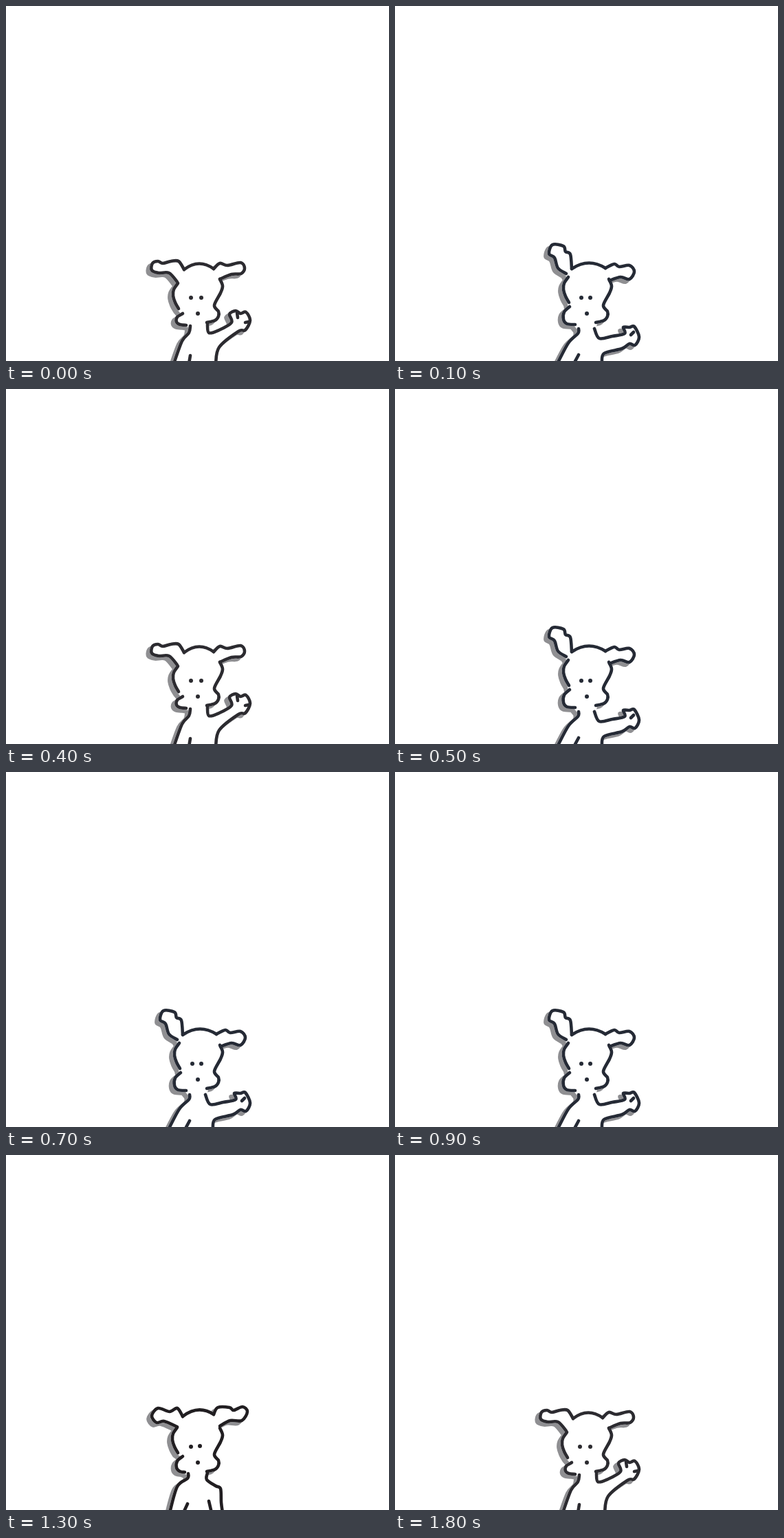
These frames come from a looping animation (557 px wide and 516 px high, 2 s). An HTML page with a canvas:

```html
<!DOCTYPE html>
<html lang="en">
<head>
<meta charset="utf-8">
<title>Waving dog</title>
<style>
html, body { margin: 0; width: 100%; height: 100%; overflow: hidden; background: #fff; }
canvas { display: block; }
</style>
</head>
<body>
<canvas id="stage" width="557" height="516"></canvas>
<script>
const ctx = document.getElementById('stage').getContext('2d');
const LOOP = 2000;
const SHADOW = { x: -5.5, y: 4.5, color: '#8f8f92' };

const toPoints = text => text.split(' ').map(pair => pair.split(',').map(Number));

// Smooth curve through key points (Catmull-Rom), as SVG path data without the first command.
function smooth(points) {
  let data = `${points[0]}`;
  for (let i = 0; i < points.length - 1; i++) {
    const a = points[i], b = points[i + 1];
    const before = points[i - 1] || a, after = points[i + 2] || b;
    const leave = a.map((v, k) => v + (b[k] - before[k]) / 6);
    const arrive = b.map((v, k) => v - (after[k] - a[k]) / 6);
    data += `C${leave} ${arrive} ${b}`;
  }
  return data;
}

// The crown bulges between the ears.
function crown([x1, y1], [x2, y2]) {
  return `${x1},${y1}Q${(x1 + x2) / 2},${(y1 + y2) / 2 - 16} ${x2},${y2}`;
}

function cheek([x1, y1], [x2, y2]) {
  const height = y2 - y1;
  return smooth([[x2, y2], [x1 - 4, y2 - 1], [x1 - 9, y1 + height * 0.72],
    [x1 - 8, y1 + height * 0.3], [x1, y1]]);
}

function leftFace([x, y]) {
  const drop = [[1, 37], [-4, 28], [-7, 18], [-6, 9], [0, 0]];
  return smooth(drop.map(([dx, dy]) => [x + dx, y + dy]));
}

const rightFace = smooth(toPoints('311,397 315,407 312,417 303,435 309,444 309,451 304,457 292,460'));

function makePose({ ink, side, cheekEnds, templeAt, leftEar, rightEar, arm, marks, eyes }) {
  const left = toPoints(leftEar), right = toPoints(rightEar);
  const parts = [
    smooth(toPoints(side)), cheek(...cheekEnds), leftFace(templeAt),
    smooth(left), crown(left.at(-1), right[0]), smooth(right),
    rightFace, smooth(toPoints(arm))
  ];
  return {
    ink,
    dots: [...eyes, [279, 447]],
    body: new Path2D('M' + parts.join('L') + 'Z'),
    strokes: [...parts, ...marks].map(data => new Path2D('M' + data))
  };
}

const waveUp = makePose({
  ink: '#2c2b30',
  side: '244,520 256,487 266,475 268,465',
  cheekEnds: [[257, 447], [262, 464]],
  templeAt: [250, 403],
  leftEar: '249,401 237,388 222,388 212,384 213,374 221,371 228,374 240,371 251,371 259,383',
  rightEar: '302,382 311,374 322,377 341,373 347,381 342,389 328,390 311,397',
  arm: '293,461 295,475 310,471 328,460 325,448 334,443 341,447 349,445 355,457 348,471 338,473 310,496 305,520',
  marks: ['266,520 268,508', '336,446 337,453', '353,459 348,460'],
  eyes: [[269, 424], [284, 424]]
});

const waveDown = makePose({
  ink: '#252a35',
  side: '236,520 252,490 266,476 267,469',
  cheekEnds: [[254, 437], [262, 463]],
  templeAt: [252, 394],
  leftEar: '249,389 237,381 232,366 224,360 229,347 245,349 248,357 255,361 257,382',
  rightEar: '306,381 319,375 326,379 341,377 348,386 341,397 328,394 312,399',
  arm: '290,469 297,483 316,480 334,476 332,467 341,467 348,466 355,481 349,493 341,491 330,498 304,505 301,520',
  marks: ['260,520 267,507', '347,474 343,478'],
  eyes: [[271, 424], [284, 424]]
});

const rest = makePose({
  ink: '#211e21',
  side: '238,520 249,482 264,470 265,463',
  cheekEnds: [[257, 438], [260, 461]],
  templeAt: [249, 396],
  leftEar: '249,395 230,387 219,389 212,379 221,368 238,373 249,368 257,380',
  rightEar: '302,377 308,367 325,367 331,371 344,366 351,373 343,386 326,386 311,394',
  arm: '293,462 292,472 305,481 312,485 313,505 315,520',
  marks: ['258,520 264,507', '295,503 299,520'],
  eyes: [[269, 424], [282, 423]]
});

function poseAt(ms) {
  if (ms >= 1800) return waveUp;
  if (ms >= 1300) return rest;
  if (ms >= 1100) return waveDown;
  return Math.floor(ms / 100) % 2 ? waveDown : waveUp;
}

function drawBody(pose, color) {
  ctx.fillStyle = ctx.strokeStyle = color;
  ctx.fill(pose.body);
  ctx.stroke(pose.body);
}

function draw(pose) {
  ctx.fillStyle = '#fff';
  ctx.fillRect(0, 0, 557, 516);
  ctx.lineCap = ctx.lineJoin = 'round';
  ctx.lineWidth = 4.6;

  ctx.save();
  ctx.translate(SHADOW.x, SHADOW.y);
  ctx.filter = 'blur(0.6px)';
  drawBody(pose, SHADOW.color);
  ctx.restore();
  drawBody(pose, '#fff');

  ctx.fillStyle = ctx.strokeStyle = pose.ink;
  pose.strokes.forEach(path => ctx.stroke(path));
  for (const [x, y] of pose.dots) {
    ctx.beginPath();
    ctx.arc(x, y, 3, 0, Math.PI * 2);
    ctx.fill();
  }
}

const start = performance.now();
function tick() {
  draw(poseAt((performance.now() - start) % LOOP));
  requestAnimationFrame(tick);
}
tick();
</script>
</body>
</html>
```
